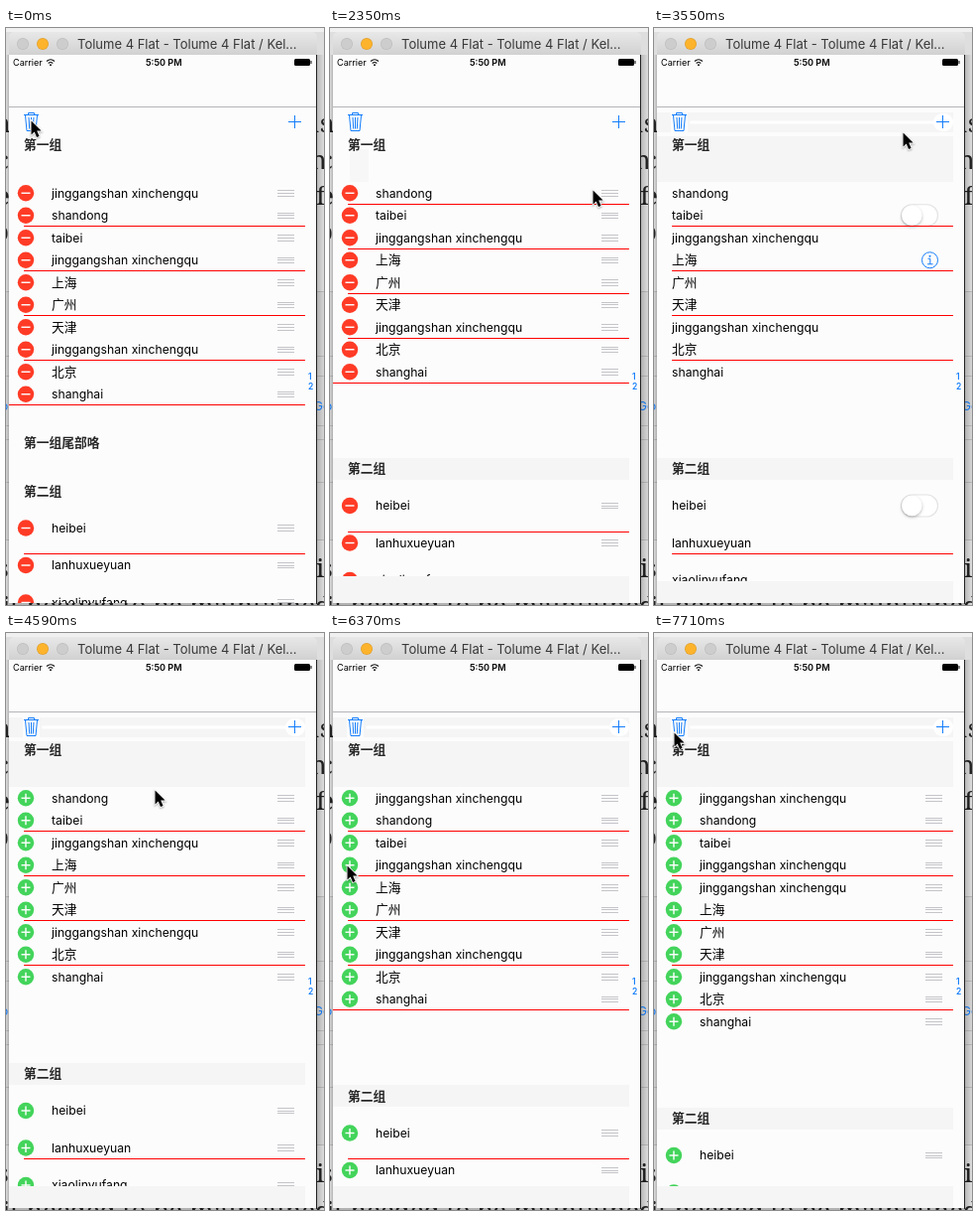
Recreate the animation shown at these times as an HTML page with a canvas. Size 321x581 px, loop 8 s.

```html
<!DOCTYPE html>
<html lang="zh-CN">
<head>
<meta charset="utf-8">
<title>Editable list</title>
<style>
html, body { margin: 0; width: 100%; height: 100%; overflow: hidden; background: #ddd; }
canvas { display: block; }
</style>
</head>
<body>
<canvas id="stage" width="321" height="581"></canvas>
<script>
const c = document.getElementById('stage').getContext('2d');
const SANS = 'Inter, "Noto Sans CJK SC", "Noto Sans CJK JP", "Noto Sans CJK", sans-serif';
const BLUE = '#157efb', RED = '#ff3b26', GREEN = '#43d45b', GREY = '#f5f5f5', PAPER = '#fcfcfc';
const LOOP = 8000, ROW = 22.5, TOP = 155;
const LONG = 'jinggangshan xinchengqu';

// time, x, y of the pointer tip
const PATH = [
  [140, 25, 93], [890, 20, 167], [1180, 20, 167], [1470, 210, 168], [1770, 265, 163],
  [2350, 265, 163], [2800, 20, 101], [3200, 20, 101], [3550, 251, 105], [4000, 288, 89],
  [4200, 288, 89], [4590, 150, 158], [5180, 18, 160], [5650, 18, 160], [6070, 17, 232],
  [6370, 17, 234], [7050, 17, 234], [7710, 20, 100]
];

function ramp(t, a, b) {
  const k = Math.min(1, Math.max(0, (t - a) / (b - a)));
  return k * k * (3 - 2 * k);
}

function rect(x, y, w, h, color) {
  c.fillStyle = color;
  c.fillRect(x, y, w, h);
}

function disc(x, y, r, color) {
  c.fillStyle = color;
  c.beginPath();
  c.arc(x, y, r, 0, 7);
  c.fill();
}

function round(x, y, w, h, r) {
  c.beginPath();
  c.roundRect(x, y, w, h, r);
}

function text(s, x, y, size = 12.2, color = '#000', weight = 400, family = SANS) {
  c.font = `${weight} ${size}px ${family}`;
  c.fillStyle = color;
  c.fillText(s, x, Math.round(y));
}

function heading(s, y) {
  text(s, 18, y, 12.75, '#282828', 700);
}

function stroke(d, color = BLUE, width = 1) {
  c.strokeStyle = color;
  c.lineWidth = width;
  c.stroke(new Path2D(d));
}

// draws with its own alpha, skipped when invisible
function faded(alpha, draw) {
  if (alpha < 0.01) return;
  c.save();
  c.globalAlpha *= alpha;
  draw();
  c.restore();
}

function label(s, x, y) {
  const han = s.charCodeAt(0) > 255;
  text(s, x, y + 4.4, han ? 12.75 : 12.2);
}

function desk() {
  rect(0, 0, 321, 581, '#dedede');
  rect(0, 0, 321, 4, '#f0f0f0');
  rect(0, 265, 321, 250, '#d6d6d6');
  for (const y of [265, 330, 350, 400, 414, 457, 515]) rect(0, y, 321, 1, '#b9b9b9');
  const bit = (s, x, y) => text(s, x, y, 26, '#222', 400, '"Noto Serif", serif');
  bit('as', 302, 105); bit('n', 307, 142); bit('f', 313, 178); bit('i', 313, 553);
  bit('n', -12, 105); bit('c', -10, 142); bit('e', -10, 178); bit('p', -13, 214); bit('s', -9, 553);
  bit('it needed to be maintained as', -4, 591);
  text('Go', 311, 385, 12, BLUE);
  text('o', -5, 385, 12, BLUE);
  const shade = c.createLinearGradient(0, 0, 321, 0);
  shade.addColorStop(0, '#0000');
  shade.addColorStop(0.01, '#0003');
  shade.addColorStop(0.975, '#0003');
  shade.addColorStop(1, '#0000');
  rect(0, 27, 321, 554, shade);
}

function windowFrame() {
  const bar = c.createLinearGradient(0, 3, 0, 27);
  bar.addColorStop(0, '#e9e9e9');
  bar.addColorStop(1, '#d1d1d1');
  c.fillStyle = bar;
  round(3, 4, 311, 24, [5, 5, 0, 0]);
  c.fill();
  [['#cdcdcd', '#bdbdbd'], ['#fdb32b', '#e0a030'], ['#cdcdcd', '#bdbdbd']].forEach(([fill, edge], i) => {
    disc(17 + 20 * i, 16, 6, edge);
    disc(17 + 20 * i, 16, 5.3, fill);
  });
  text('Tolume 4 Flat - Tolume 4 Flat / Kel...', 72, 21, 13, '#383838');
  rect(313, 27, 1, 553, '#222');
  rect(3, 27, 310, 552, PAPER);
}

function statusBar() {
  text('Carrier', 7, 38, 9.1);
  stroke('M41 33.5Q45 30 49 33.5M42.7 35.5Q45 33.5 47.3 35.5', '#111', 1.2);
  disc(45, 37.3, 1, '#111');
  text('5:50 PM', 141, 38, 9.1, '#000', 600);
  c.fillStyle = '#000';
  round(291, 31, 16, 7, 1.5);
  c.fill();
  rect(307.5, 33, 1, 3, '#000');
  rect(3, 79, 310, 1, '#b5b5b8');
}

function toolbar(t) {
  if (t >= 3300) {
    rect(3, 85, 299, 20, GREY);
    c.fillStyle = '#fff';
    round(36, 93.5, 250, 3, 1.5);
    c.fill();
    round(282, 86, 20, 18, 9);
    c.fill();
    rect(17, 85, 17, 20, PAPER);
  }
  stroke('M18 87.5H33M22.5 87V85.5H28.5V87M19.5 88L21 103.5H30L31.5 88M23 90L23.7 101.5M25.5 90V101.5M28 90L27.3 101.5');
  stroke('M285 94.5H298M291.5 88V101');
}

function badge(x, y, adding) {
  disc(x, y, 8.2, adding ? GREEN : RED);
  rect(x - 4.5, y - 0.7, 9, 1.4, '#fff');
  if (adding) rect(x - 0.7, y - 4.5, 1.4, 9, '#fff');
}

function grip(x, y) {
  for (const d of [-2.75, 0, 2.75]) rect(x, Math.floor(y + d), 17, 1, '#c4c4c9');
}

function toggle(y) {
  c.strokeStyle = '#e4e4e4';
  c.lineWidth = 1.2;
  c.fillStyle = '#fff';
  round(249.5, y - 11, 37, 22, 11);
  c.fill();
  c.stroke();
  c.save();
  c.shadowColor = '#0004';
  c.shadowBlur = 3;
  c.shadowOffsetY = 1.5;
  disc(260.3, y, 10.3, '#fff');
  c.restore();
}

function info(y) {
  c.strokeStyle = BLUE;
  c.lineWidth = 1;
  c.beginPath();
  c.arc(278.5, y, 8, 0, 7);
  c.stroke();
  stroke(`M276.5 ${y - 1.5}H278.8V${y + 4}M276 ${y + 4}H281.5`);
  disc(278.5, y - 4, 1, BLUE);
}

function cell(name, y, edit, adding, extra) {
  label(name, 18 + 28 * edit, y);
  faded(edit, () => {
    badge(20 - 28 * (1 - edit), y, adding);
    grip(274 + 28 * (1 - edit), y);
  });
  if (extra) faded(1 - edit, () => extra(y));
}

// every second separator is visible; the one closing the section spans the full width
function rules(t, gone) {
  const lift = t < 2500 ? Math.round(22 * gone) : 0;
  const count = t >= 2500 && t < 5500 ? 4 : 5;
  for (let i = 0; i < count; i++) {
    const x = i === 4 && t < 6670 ? 3 : 18;
    rect(x, 199 + 45 * i - lift, 302 - x, 1, '#f00');
  }
  if (t < 6670) rect(18, 529 - lift, 284, 1, '#f00');
}

function list(t) {
  const gone = ramp(t, 1800, 2150);
  const first = ramp(t, 5330, 5650);
  const second = ramp(t, 6670, 7000);
  const edit = 1 - ramp(t, 3100, 3380) + ramp(t, 4150, 4420);
  const adding = t > 3700;
  const slide = 70 * ramp(t, 1180, 1450);
  const rows = [
    [LONG, 1 - gone], [LONG, first], ['shandong', 1], ['taibei', 1, toggle], [LONG, second],
    [LONG, 1], ['上海', 1, info], ['广州', 1], ['天津', 1], [LONG, 1], ['北京', 1], ['shanghai', 1]
  ];

  c.save();
  c.beginPath();
  c.rect(3, 80, 310, 499);
  c.clip();

  if (t >= 3250) rect(3, 109, 299, 46, GREY);
  else if (t > 600) rect(20, 122, 19, 33, '#f7f7f7');
  heading('第一组', 122);

  let y = TOP;
  rows.forEach(([name, share, extra], i) => {
    const mid = y + ROW * share - ROW / 2;
    faded(share, () => {
      if (i || !slide) return cell(name, mid, edit, adding, extra);
      c.beginPath();
      c.rect(3, TOP, 299, ROW * share);
      c.clip();
      c.save();
      c.translate(-slide, 0);
      cell(name, mid, edit, adding);
      c.restore();
      rect(313 - slide, mid - 11, 59, 22, RED);
      text('Delete', 322 - slide, mid + 4.2, 12.4, '#fff');
    });
    y += ROW * share;
  });

  faded(1 - gone, () => heading('第一组尾部咯', y + 42));
  if (gone > 0.5) rect(3, Math.round(y + 75), 299, 22, GREY);
  heading('第二组', y + 90.6);
  ['heibei', 'lanhuxueyuan', 'xiaolinyufang'].forEach((name, i) =>
    cell(name, y + 123.5 + 37.5 * i, edit, adding, i ? null : toggle));
  rules(t, gone);

  if (gone > 0.5) {
    const edge = t < 2500 ? 552 : 557;
    rect(3, edge, 299, 579 - edge, GREY);
    rect(302, edge, 11, 579 - edge, PAPER);
  }
  text('1', 305, 353.5, 8.5, BLUE, 600);
  text('2', 305, 364, 8.5, BLUE, 600);
  c.restore();
}

function pointer(t) {
  let i = PATH.findIndex(p => p[0] > t);
  if (i < 0) i = PATH.length;
  const a = PATH[Math.max(0, i - 1)], b = PATH[Math.min(i, PATH.length - 1)];
  const k = a === b ? 0 : ramp(t, a[0], b[0]);
  c.save();
  c.translate(a[1] + (b[1] - a[1]) * k, a[2] + (b[2] - a[2]) * k);
  const arrow = new Path2D('M0.5 0.5V14.5L3.7 11.5L6 17L8.6 16L6.2 10.6H10.6Z');
  c.shadowColor = '#0005';
  c.shadowBlur = 2;
  c.shadowOffsetY = 1;
  c.lineWidth = 1.6;
  c.strokeStyle = '#fff';
  c.stroke(arrow);
  c.shadowColor = 'transparent';
  c.fillStyle = '#000';
  c.fill(arrow);
  c.restore();
}

function draw() {
  const t = performance.now() % LOOP;
  desk();
  windowFrame();
  statusBar();
  toolbar(t);
  list(t);
  pointer(t);
  requestAnimationFrame(draw);
}
draw();
</script>
</body>
</html>
```
